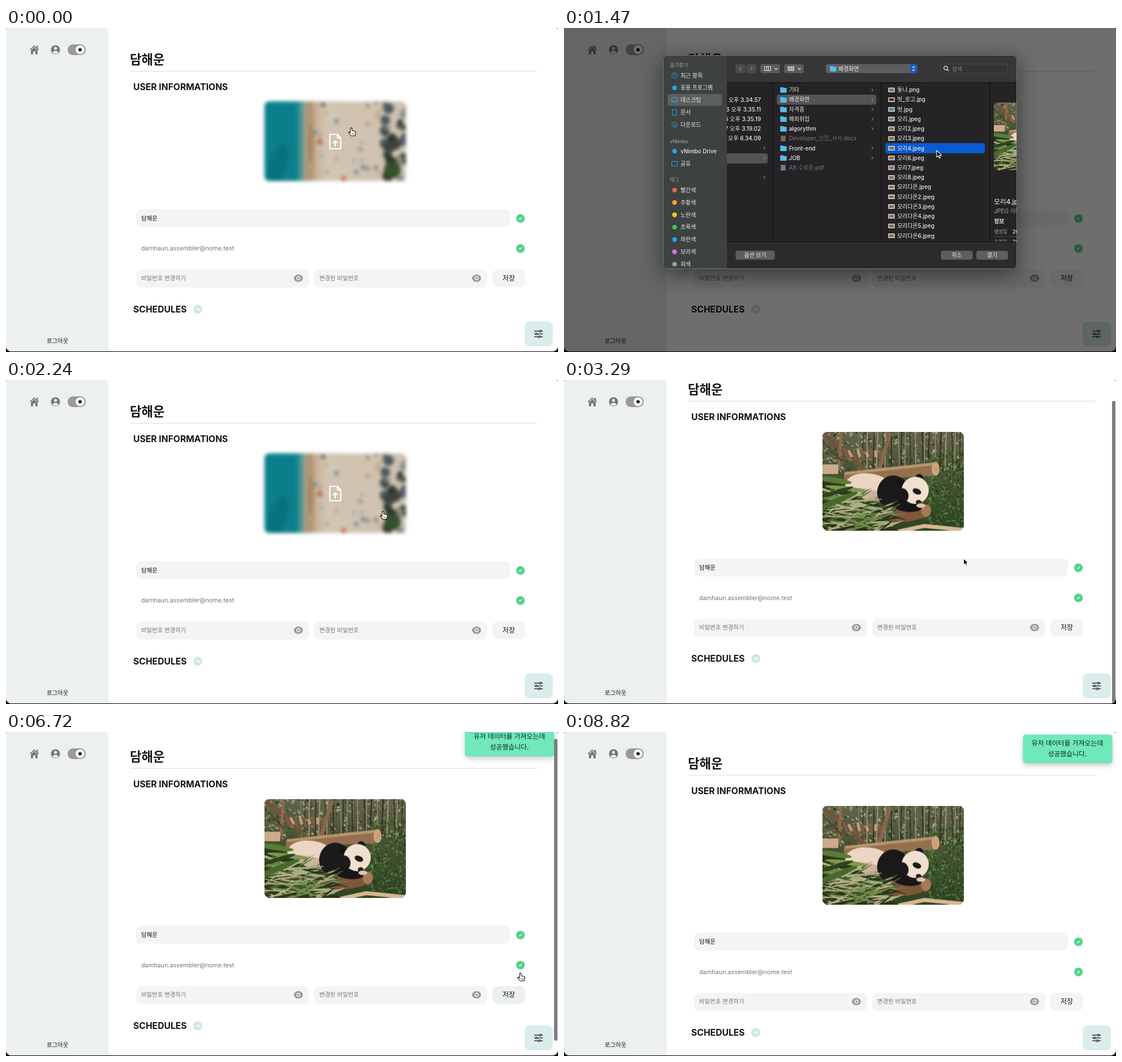
Animation, 976 px wide and 574 px high, one loop 9.38 s. Source, as an HTML page with a canvas:

```html
<!DOCTYPE html>
<html lang="ko">
<head>
<meta charset="utf-8">
<title>User page</title>
<style>
html, body { margin: 0; width: 100%; height: 100%; overflow: hidden; background: #000; }
canvas { display: block; width: 976px; height: 574px; }
</style>
</head>
<body>
<canvas id="stage" width="976" height="574"></canvas>
<script>
const W = 976, H = 574, LOOP = 9380, TICK = 70;
const FONT = 'Inter, "Noto Sans CJK KR", "Noto Sans CJK", sans-serif';
const USER = '담해운', MAIL = 'damhaun.assembler@nome.test';
const stage = document.getElementById('stage').getContext('2d');
let c = stage;

const ramp = (t, a, b) => Math.min(1, Math.max(0, (t - a) / (b - a)));
const easeOut = p => 1 - (1 - p) * (1 - p);
const smooth = p => p * p * (3 - 2 * p);

function layer(w, h, draw) {
  const cv = document.createElement('canvas');
  cv.width = w; cv.height = h;
  const old = c;
  c = cv.getContext('2d');
  draw();
  c = old;
  return cv;
}
function text(s, x, y, size, color, weight = 400, align = 'left') {
  c.font = `${weight} ${size}px ${FONT}`;
  c.fillStyle = color;
  c.textAlign = align;
  c.fillText(s, x, y + size * 0.36);
}
function box(x, y, w, h, r, color) {
  c.fillStyle = color;
  c.beginPath(); c.roundRect(x, y, w, h, r); c.fill();
}
function oval(x, y, rx, ry, color, rot = 0) {
  c.fillStyle = color;
  c.beginPath(); c.ellipse(x, y, rx, ry, rot, 0, 7); c.fill();
}
const dot = (x, y, r, color) => oval(x, y, r, r, color);
function line(color, width, ...p) {
  c.strokeStyle = color; c.lineWidth = width;
  c.beginPath();
  for (let i = 0; i < p.length; i += 2) c.lineTo(p[i], p[i + 1]);
  c.stroke();
}
function poly(color, ...p) {
  c.fillStyle = color;
  c.beginPath();
  for (let i = 0; i < p.length; i += 2) c.lineTo(p[i], p[i + 1]);
  c.closePath(); c.fill();
}
function ring(x, y, r, color, width = 1) {
  c.strokeStyle = color; c.lineWidth = width;
  c.beginPath(); c.arc(x, y, r, 0, 7); c.stroke();
}
function random(seed) {
  return () => (seed = (seed * 16807) % 2147483647) / 2147483647;
}
function clipRound(w, h, r) {
  c.beginPath(); c.roundRect(0, 0, w, h, r); c.clip();
}

// Pictures
const beach = layer(250, 141, () => {
  const r = random(41);
  clipRound(250, 141, 8);
  const g = c.createLinearGradient(0, 0, 250, 0);
  [[0, '#08808c'], [.22, '#0b7f89'], [.26, '#4a9696'], [.29, '#a9a08a'], [.32, '#b08f6d'],
   [.37, '#c7b39a'], [.43, '#d2c4b2'], [1, '#cfc1ae']].forEach(s => g.addColorStop(...s));
  c.fillStyle = g; c.fillRect(0, 0, 250, 141);
  oval(24, 112, 15, 38, '#08717d', .3);
  oval(82, 75, 5, 34, '#a9855f');
  for (let i = 0; i < 22; i++)
    dot(90 + r() * 115, r() * 141, 1.5 + r() * 2.2, ['#6f8796', '#8f7f74', '#4d6f8c', '#b5654d'][i % 4]);
  for (let i = 0; i < 34; i++)
    dot(212 + r() * 38, r() * 141, 4 + r() * 7, ['#3b443e', '#4d5960', '#2c3a2c', '#8b8a80'][i % 4]);
  oval(226, 122, 15, 14, '#34522b');
  dot(98, 72, 4, '#c4513c'); dot(140, 137, 4, '#b5623f'); dot(104, 6, 4, '#4f6c80');
});
const beachBlur = layer(274, 165, () => {
  c.filter = 'blur(3px)';
  c.drawImage(beach, 12, 12);
});
const panda = layer(250, 175, () => {
  const r = random(77);
  clipRound(250, 175, 9);
  const g = c.createLinearGradient(0, 0, 0, 175);
  g.addColorStop(0, '#63644a'); g.addColorStop(.4, '#4a5236'); g.addColorStop(1, '#2f4423');
  c.fillStyle = g; c.fillRect(0, 0, 250, 175);
  for (let i = 0; i < 420; i++)
    oval(r() * 250, r() * 75, 1 + r() * 3, .8 + r() * 1.4, ['#8b8f6c', '#343d26', '#a9a68c', '#596a3c'][i % 4], r() * 3);
  for (let i = 0; i < 22; i++) {
    const x = 60 + i * 8.6 + r() * 6;
    line(i % 2 ? '#363224' : '#958b76', 1 + r() * 1.6, x, 0, x + r() * 6 - 3, 70);
  }
  for (let i = 0; i < 480; i++)
    oval(182 + r() * 68, 38 + r() * 130, 1 + r() * 2.6, 1, ['#3d6a2c', '#22381b', '#628b4a', '#345729'][i % 4], r() * 3);
  line('#76513a', 7, -2, 2, 35, 30, 80, 72);
  line('#8e6a4a', 5, 33, 0, 29, 66);
  line('#8a664a', 7, 120, 2, 100, 66);
  line('#55402f', 3, 0, 16, 34, 52);
  for (let i = 0; i < 9; i++)
    line(i % 2 ? '#c09c78' : '#7d5a42', 5, 38 + i * 8, 30 + (i % 3) * 3, 45 + i * 7, 50 - (i % 2) * 5);
  box(0, 58, 28, 17, 1, '#cbab8b');
  poly('#94704f', 38, 72, 200, 54, 200, 78, 38, 86);
  line('#b8946e', 5, 40, 74, 200, 57);
  oval(200, 66, 7, 12, '#cda67a');
  ring(200, 66, 3, '#b58d63');
  oval(150, 145, 42, 14, '#7f5639', -.12);
  oval(183, 140, 9, 11, '#a87955');
  oval(82, 98, 42, 24, '#ecd6c3', .12);
  oval(82, 112, 36, 10, '#cdb39c', .2);
  oval(123, 106, 26, 29, '#1b1a1b', .4);
  oval(150, 132, 26, 10, '#171617', .1);
  dot(171, 82, 7, '#161516'); dot(139, 90, 7, '#161516');
  oval(164, 104, 24, 24, '#f1dfd0', .3);
  oval(167, 106, 8, 5, '#1b1a1b', .4);
  oval(143, 112, 9, 12, '#1c1b1c', -.3);
  oval(170, 125, 5, 4, '#27211f');
  oval(174, 131, 8, 4, '#dcc5b4');
  line('#d8b793', 7, 120, 180, 180, 167, 250, 174);
  poly('#2a351c', 0, 80, 30, 92, 70, 118, 130, 140, 108, 162, 135, 175, 0, 175);
  for (let i = 0; i < 130; i++) {
    const x = r() * 122 - 8, y = 100 + r() * 80, a = -.7 + r() * 1.1, n = 10 + r() * 28;
    oval(x, Math.max(y, 84 + x * .55), n, .8 + r() * 1.5,
      ['#6f8a4a', '#26361a', '#a3b080', '#47612c', '#b9ae85'][i % 5], a);
  }
  oval(28, 122, 38, 5, '#47692b', -.42); oval(20, 86, 32, 5, '#5a7d34', .15);
  oval(42, 101, 38, 4, '#7c9a4c', .12); oval(22, 108, 34, 4, '#2d441d', -.3);
});

// Page
function check(y) {
  dot(910, y + 1, 8.2, '#d9eee2');
  dot(909.5, y, 7.4, '#4ad586');
  line('#fff', 1.2, 906.8, y, 908.8, y + 2, 912.2, y - 2);
}
function eye(x, y) {
  oval(x, y, 8, 6.5, '#9d9b9e');
  ring(x, y, 2.8, '#f4f4f4', 1.5);
}
function sideIcons() {
  const gray = '#78767a';
  c.lineCap = c.lineJoin = 'round';
  line(gray, 1.8, 42.8, 38.5, 50, 31.8, 57.2, 38.5);
  c.lineCap = 'butt'; c.lineJoin = 'miter';
  box(54, 31.5, 2.4, 5, 0, gray);
  poly(gray, 50, 34.3, 56, 40, 56, 46.5, 52, 46.5, 52, 41.5, 48, 41.5, 48, 46.5, 44, 46.5, 44, 40);
  dot(87.5, 38.5, 8, gray);
  dot(87.5, 36, 2.6, '#ecf0ef');
  oval(87.5, 43, 4.7, 2.6, '#ecf0ef');
  box(109, 29, 32, 19, 9.5, '#9a989e');
  dot(131, 38.5, 7.8, '#fff');
  dot(131, 38.5, 2.8, '#111');
  for (let a = 0; a < 8; a++) {
    const x = Math.cos(a * Math.PI / 4), y = Math.sin(a * Math.PI / 4);
    line('#555', .8, 131 + x * 3.6, 38.5 + y * 3.6, 131 + x * 4.4, 38.5 + y * 4.4);
  }
}
function uploadIcon() {
  c.lineJoin = 'round';
  line('#fff', 2.2, 586, 188.5, 572.5, 188.5, 572.5, 214, 592, 214, 592, 195, 586, 188.5, 586, 195, 592, 195);
  line('#fff', 2, 582, 210, 582, 200);
  line('#fff', 2, 578, 204, 582, 200, 586, 204);
}
function page(t, scroll) {
  const saved = t >= 2660, d = saved ? 34.3 : 0;
  const hover = t < 1400 || (t >= 2240 && t < 2450);
  c.fillStyle = '#000'; c.fillRect(0, 0, W, H);
  c.save();
  c.beginPath(); c.roundRect(0, 0, W, 573, [3, 3, 9, 9]); c.clip();
  c.fillStyle = '#fff'; c.fillRect(0, 0, W, H);
  c.fillStyle = '#ecf0ef'; c.fillRect(0, 0, 181, H);
  sideIcons();
  text('로그아웃', 72, 554, 10.4, '#111', 500);

  c.save();
  c.translate(0, -scroll);
  text(USER, 219, 55.5, 22.3, '#161616', 700);
  c.fillStyle = '#dcdcdc'; c.fillRect(219, 76, 720, 1);
  text('USER INFORMATIONS', 225, 104, 15.7, '#141414', 700);
  if (saved) c.drawImage(panda, 457, 130.5);
  else if (hover) { c.drawImage(beachBlur, 445, 118); uploadIcon(); }
  else c.drawImage(beach, 457, 130);

  c.translate(0, d);
  box(230, 321, 661, 32, 9, '#f4f4f4');
  text(USER, 239, 337, 10.5, '#111', 500);
  check(337.3);
  if (t > 1470 && t < 2030) box(230, 375, 661, 32, 9, '#f4f4f4');
  text(MAIL, 239, 390.5, 10.8, '#757575');
  check(390.5);
  box(230, 428, 306, 32, 9, '#f4f4f4');
  box(545, 428, 306, 32, 9, '#f4f4f4');
  text('비밀번호 변경하기', 239, 443.3, 10.4, '#757575');
  text('변경된 비밀번호', 554, 443.3, 10.4, '#757575');
  eye(517, 443.3); eye(832, 443.3);
  box(860, 428, 58, 31, 9, t >= 4130 && t < 7070 ? '#ecf1f0' : '#f4f4f4');
  text('저장', 889, 443.3, 12, '#111', 500, 'center');
  text('SCHEDULES', 225, 498, 15.7, '#141414', 700);
  dot(339, 498.3, 8, '#cde9e1');
  line('#fff', 1.2, 335.5, 498.3, 342, 498.3);
  line('#fff', 1.2, 339.5, 495.8, 342, 498.3, 339.5, 500.8);
  c.translate(0, -d);

  if (t >= 4620) {
    c.save();
    c.shadowColor = 'rgba(0,0,0,.2)'; c.shadowBlur = 10; c.shadowOffsetY = 4;
    box(811.5, 4.5, 158, 51, 5, '#70e8b9');
    c.restore();
    text('유저 데이터를 가져오는데', 890, 20, 11.9, '#10281f', 500, 'center');
    text('성공했습니다.', 890, 39, 11.9, '#10281f', 500, 'center');
  }
  c.restore();

  box(917, 520, 50, 44, 9, '#d9eeec');
  [[537, 945], [542, 938], [547, 943]].forEach(([y, x]) => {
    line('#333', 1.5, 934, y, 949, y);
    dot(x, y, 2.3, '#333'); dot(x, y, .9, '#d9eeec');
  });

  const bar = t < 5000 ? ramp(t, 2870, 3010) * (1 - ramp(t, 3640, 4060))
    : ramp(t, 5880, 6020) * (1 - ramp(t, 7000, 7420));
  c.globalAlpha = bar;
  box(969, 1 + scroll * .92, 6, 535, 3, '#7d7d7d');
  c.globalAlpha = ramp(t, 4550, 4690) * (1 - ramp(t, 4900, 5110));
  if (c.globalAlpha > 0) {
    box(0, 557, 325, 17, [0, 4, 0, 0], '#7a7b7b');
    text('innerhost의 응답을 기다리는 중...', 4, 565, 9.6, '#f4f4f4');
  }
  c.restore();
}

// File dialog
const TXT = '#eceaec', DIM = '#858385', BLUE = '#0a5bd0', ICON = '#2aa3e6';
function chevron(x, y, color = '#a8a6a8') { line(color, 1, x - 1.3, y - 2.6, x + 1.3, y, x - 1.3, y + 2.6); }
function folder(x, y) {
  box(x, y - 5, 6, 4, 1, '#3aa5df');
  box(x, y - 3.6, 11.5, 8.6, 1, '#55bdf1');
}
function thumb(x, y, i) {
  box(x, y - 4, 11.5, 8, 1, '#eee');
  box(x + 1.3, y - 2.7, 9, 5.4, 0, ['#6c7a82', '#4c2f22', '#59808a', '#7b805c', '#86725a'][Math.min(4, i)]);
}
function sidebar() {
  c.save();
  c.beginPath(); c.rect(175, 48, 113, 379); c.clip();
  c.fillStyle = '#3d4140'; c.fillRect(175, 48, 113, 379);
  const head = (s, y) => text(s, 187, y, 8.9, '#989c9b', 500);
  const row = (s, y) => text(s, 206, y, 9.9, TXT, 500);
  head('즐겨찾기', 65.5);
  box(183, 117, 96, 21, 4, '#5b5f5e');
  ['최근 항목', '응용 프로그램', '데스크탑', '문서', '다운로드'].forEach((s, i) => row(s, 84 + i * 21.8));
  head('vNimbo', 201);
  row('vNimbo Drive', 218.3); row('공유', 240.3);
  head('태그', 268.5);
  [['빨간색', '#e6655c'], ['주황색', '#f0a72c'], ['노란색', '#f7c927'], ['초록색', '#34d15b'],
   ['파란색', '#2ba2f3'], ['보라색', '#dc70d3'], ['회색', '#9b9b9d']].forEach(([s, color], i) => {
    const y = 287.3 + i * 21.85;
    dot(195.5, y, 4.2, color); row(s, y);
  });
  ring(195.5, 84, 4.8, ICON); line(ICON, 1, 195.5, 81, 195.5, 84, 193, 84);
  dot(195.5, 106, 4.2, ICON);
  c.strokeRect(190.5, 123.5, 10, 8); line(ICON, 1, 190, 129, 201, 129);
  c.strokeRect(192, 144.5, 7, 10);
  ring(195.5, 171.3, 4.8, ICON); line(ICON, 1, 195.5, 168.5, 195.5, 174); line(ICON, 1, 193.5, 172, 195.5, 174, 197.5, 172);
  dot(195.5, 218.3, 4.2, ICON);
  c.strokeRect(190.5, 236.5, 10, 8);
  c.restore();
}
function toolbar(active, canOpen) {
  box(303, 64, 18, 16, 4, '#4c4a4c'); box(323, 64, 17, 16, 4, '#4c4a4c');
  line('#8a888a', 1.2, 313.5, 69, 310.5, 72, 313.5, 75);
  line('#8a888a', 1.2, 330, 69, 333, 72, 330, 75);
  box(347, 64, 35, 16, 4, '#5b595b'); box(389, 64, 35, 16, 4, '#5b595b');
  c.strokeStyle = TXT; c.lineWidth = 1;
  c.strokeRect(354.5, 68.5, 11, 7); c.strokeRect(358.5, 68.5, 3, 7);
  for (let i = 0; i < 6; i++) c.strokeRect(396 + i % 3 * 4, 68.5 + (i > 2) * 4.5, 2.4, 2.4);
  [375, 416].forEach(x => line(TXT, 1.2, x - 2.5, 71, x, 73.5, x + 2.5, 71));
  box(463, 64, 162, 16, 4, '#5f5d5f');
  if (active) box(612, 65, 12, 14, 3, BLUE);
  line(TXT, 1.2, 615.5, 70.5, 618, 68, 620.5, 70.5);
  line(TXT, 1.2, 615.5, 73.5, 618, 76, 620.5, 73.5);
  folder(470, 72); text('배경화면', 485, 72, 9.9, TXT, 500);
  box(666, 64, 118, 16, 4, '#343234');
  c.strokeStyle = '#4b494b'; c.lineWidth = 1; c.stroke();
  ring(675, 71, 3.3, TXT, 1.2); line(TXT, 1.2, 677.3, 73.5, 680, 76);
  text('검색', 686, 72, 9.9, '#8a888a');
  const button = (s, x, w, bg, color) => {
    box(x, 394.5, w, 16, 4, bg); text(s, x + w / 2, 402.3, 9.9, color, 500, 'center');
  };
  button('옵션 보기', 303.5, 69, '#5f5d5f', TXT);
  button('취소', 666.5, 56, '#5f5d5f', TXT);
  button('열기', 729, 56, canOpen ? '#5f5d5f' : '#403e40', canOpen ? TXT : '#747274');
}
function columns(picked, shift, active) {
  const rowY = i => 109.7 + i * 17.22;
  c.save();
  c.beginPath(); c.rect(288, 97, 513, 281); c.clip();
  c.translate(-188 * shift, 0);
  [417, 609, 801].forEach(x => { c.fillStyle = '#0f0e0f'; c.fillRect(x, 97, 1, 281); });

  text('면접 AI', 314, rowY(0), 9.9, DIM, 500, 'right');
  ['26 오후 3.34.57', '26 오후 3.35.11', '26 오후 3.35.19', '27 오후 3.19.02', '7 오후 6.34.09'].forEach((s, i) =>
    text('스크린샷 2024...' + s, 397, rowY(i + 1), 10.1, TXT, 500, 'right'));
  text('BACKEND', 318, rowY(6), 9.9, TXT, 500, 'right');
  box(230, 222, 179, 18, 4, '#545254');
  text('files', 295, rowY(9), 9.9, TXT, 500, 'right');
  [6, 7, 9].forEach(i => chevron(403, rowY(i)));

  box(425, 118, 176, 18, 4, picked ? '#545254' : BLUE);
  ['기타', '배경화면', '자격증', '해외취업', 'algorythm', 'Developer_신입_서식.docx', 'Front-end', 'JOB', 'AB 수료증.pdf'].forEach((s, i) => {
    const y = rowY(i), doc = i === 5 || i === 8;
    if (doc) box(432, y - 5, 8.5, 10, 1, i === 5 ? '#7a6658' : '#7d7b7d');
    else { folder(431, y); chevron(594, y); }
    text(s, 446.5, y, 9.9, doc ? '#6f6d6f' : TXT, 500);
  });

  if (picked) box(617, 204, 176, 18, 4, active ? BLUE : '#5f5d5f');
  ['돛나.png', '벗_로고.jpg', '벗.jpg', '모리.jpeg', ...[2, 3, 4, 6, 7, 8].map(n => `모리${n}.jpeg`),
   '모리다온.jpeg', ...[2, 3, 4, 5, 6].map(n => `모리다온${n}.jpeg`)].forEach((s, i) => {
    thumb(622, rowY(i), i);
    text(s, 638, rowY(i), 9.9, TXT, 500);
  });

  if (shift > 0) {
    c.drawImage(panda, 809, 132, 171, 120);
    text('모리4.jpeg', 809, 308, 11.7, TXT, 500);
    text('JPEG 이미지 - 790KB', 809, 324, 10.2, '#a9a7a9');
    text('정보', 809, 342.5, 9.8, TXT, 600);
    text('간략히 보기', 980, 343, 8.6, '#3fa0e8', 400, 'right');
    ['생성일', '수정일'].forEach((s, i) => {
      const y = 361 + i * 17.5;
      text(s, 809, y, 8.6, '#a9a7a9');
      text('2024년 3월 24일 일요일 오후 10:26', 980, y, 8.8, TXT, 500, 'right');
      c.fillStyle = '#4a484a'; c.fillRect(809, y + 8, 171, 1);
    });
  }
  c.restore();
}
const sheet = document.createElement('canvas');
sheet.width = W; sheet.height = H;
function dialog(t, closing) {
  const shift = smooth(ramp(t, 1400, 1610)), picked = t >= 1260, active = t < 1610;
  const old = c;
  c = sheet.getContext('2d');
  c.clearRect(0, 0, W, H);
  c.save();
  c.shadowColor = 'rgba(0,0,0,.5)'; c.shadowBlur = 38; c.shadowOffsetY = 9;
  box(175, 48, 626, 379, 8, '#252325');
  c.restore();
  c.save();
  c.beginPath(); c.roundRect(175, 48, 626, 379, 8); c.clip();
  c.fillStyle = '#373537'; c.fillRect(288, 48, 513, 48);
  c.fillStyle = '#2c2a2c'; c.fillRect(288, 379, 513, 48);
  c.fillStyle = '#121112'; c.fillRect(288, 96, 513, 1); c.fillRect(288, 378, 513, 1);
  columns(picked, shift, active);
  toolbar(active, picked);
  sidebar();
  c.restore();
  c.strokeStyle = '#777577'; c.lineWidth = 1;
  c.beginPath(); c.roundRect(175.5, 48.5, 625, 378, 8); c.stroke();
  c = old;
  c.globalAlpha = ramp(t, 210, 420) * (1 - closing);
  c.drawImage(sheet, 0, -25 * closing);
  c.globalAlpha = 1;
}

// Pointer stops: start, end, x, y
const MOVES = [
  [0, 1, 610.5, 177], [700, 1190, 659, 217], [2170, 2450, 706.5, 316], [3640, 4270, 903, 447],
  [5250, 5530, 909.5, 427], [7000, 7840, 508, 291], [8120, 8610, 862, 577]
];
function pointer(t) {
  let [, , x, y] = MOVES[0];
  MOVES.slice(1).forEach(([a, b, px, py]) => {
    const p = smooth(ramp(t, a, b));
    x += (px - x) * p; y += (py - y) * p;
  });
  const hand = t < 140 || (t >= 1610 && t < 2450) || (t >= 4130 && t < 7070);
  const pts = hand
    ? [-1.5, 1, 0, -.2, 1.5, 1, 1.5, 5, 6.5, 6, 8, 7.5, 7.5, 11, 6.5, 14, -.5, 14, -5, 8.5, -3.8, 7, -1.5, 9]
    : [0, 0, 0, 11.8, 2.7, 9.3, 4.7, 13.6, 6.6, 12.8, 4.8, 8.6, 8.4, 8.6];
  c.save();
  c.translate(x, y);
  c.lineJoin = 'round';
  poly(hand ? '#fff' : '#000', ...pts);
  c.strokeStyle = hand ? '#111' : '#fff'; c.lineWidth = 1.1;
  c.stroke();
  if (hand) [1.2, 3.2, 5.2].forEach(n => line('#555', .8, n, 9, n, 12));
  c.restore();
}

function frame(now) {
  const t = Math.floor((now % LOOP) / TICK) * TICK;
  const scroll = 39 * easeOut(ramp(t, 2870, 3290)) - 9 * ramp(t, 5880, 6090) - 30 * ramp(t, 6510, 6860);
  page(t, scroll);
  if (t >= 280 && t < 2030) {
    const closing = easeOut(ramp(t, 1640, 2000));
    c.fillStyle = `rgba(0,0,0,${.57 * ramp(t, 210, 420) * (1 - closing)})`;
    c.fillRect(0, 0, W, H);
    dialog(t, closing);
  }
  pointer(t);
}
const start = performance.now();
function loop() {
  frame(performance.now() - start);
  requestAnimationFrame(loop);
}
loop();
</script>
</body>
</html>
```
